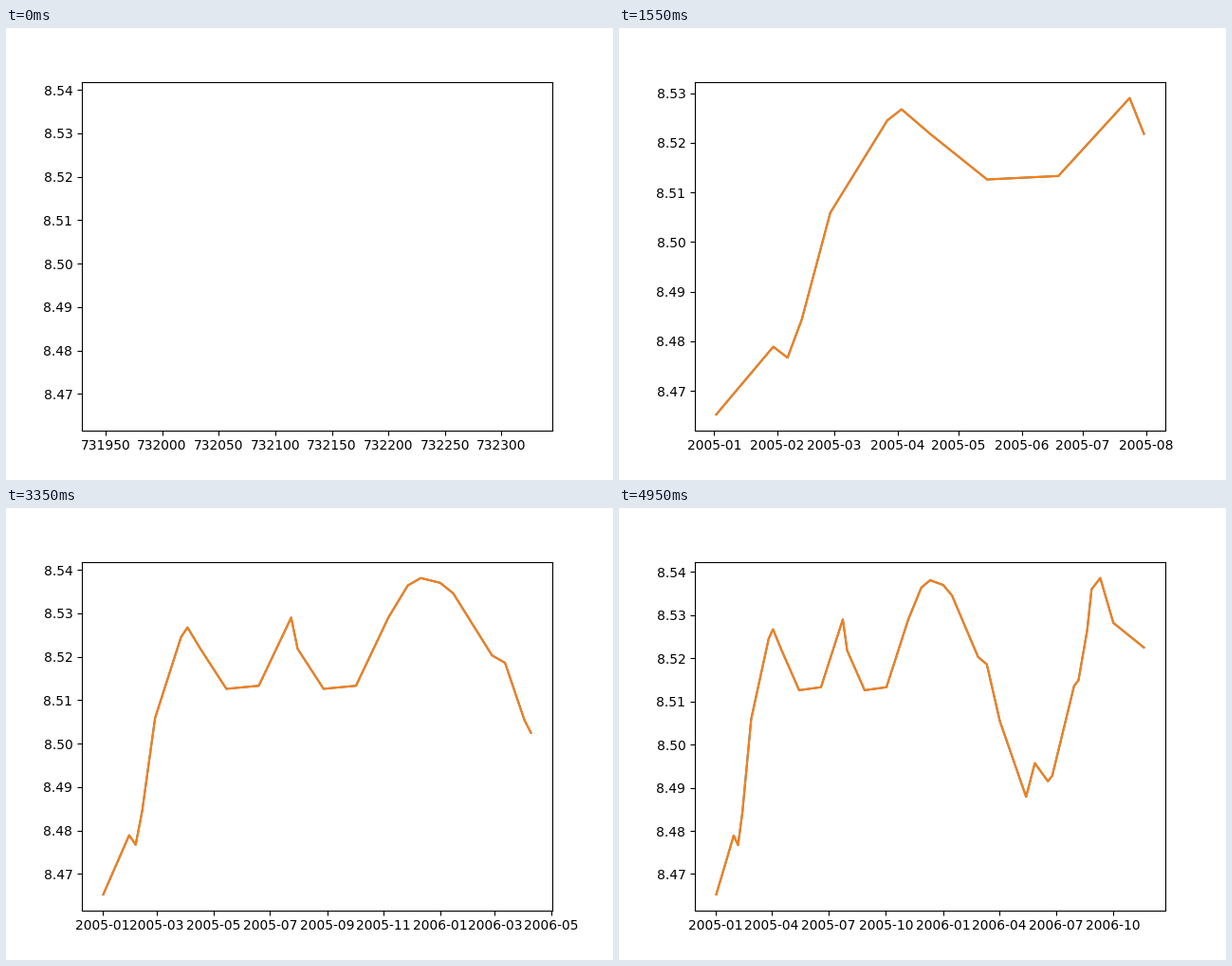
Write a matplotlib script that moves like this. It is 640 by 476 pixels and loops after 5000 ms.

```python
import numpy as np
import matplotlib.pyplot as plt
from matplotlib.animation import FuncAnimation

WEEKS = 99
INTERVAL = 50
FIRST_DAY = 731948  # ordinal of 2005-01-02
PREVIEW_WEEKS = 55
DIP_PERIOD = 15

# Turning points as (week, ten-thousandths above 8.4)
rise = [(0, 652.6), (4, 789), (5, 767), (6, 844), (8, 1059), (12, 1245),
        (13, 1267.3)]
dip = [(15, 1218), (19, 1126), (24, 1133), (29, 1290)]
second_dip = [(week + DIP_PERIOD, level) for week, level in dip]
fall = [(47, 1364), (49, 1381), (52, 1370), (54, 1346), (60, 1203),
        (62, 1186), (65, 1054), (71, 879)]
recovery = [(73, 957), (76, 915), (77, 928), (82, 1136), (83, 1149),
            (85, 1265), (86, 1360), (88, 1386), (91, 1282), (98, 1225)]

key_weeks, key_levels = zip(*rise, *dip, *second_dip, *fall, *recovery)
weeks = np.arange(WEEKS)
values = 8.4 + np.interp(weeks, key_weeks, key_levels) / 1e4
days = np.datetime64("2005-01-02") + 7 * weeks

plt.rcParams["font.family"] = "DejaVu Sans"
fig, ax = plt.subplots(figsize=(6.4, 4.76), dpi=100)


def padded(low, high):
    pad = 0.05 * (high - low)
    return low - pad, high + pad


def draw(n):
    ax.clear()
    if n == 0:
        # Empty axes on a plain day-number scale
        shown = values[:PREVIEW_WEEKS]
        ax.set_xlim(*padded(FIRST_DAY, FIRST_DAY + 7 * (PREVIEW_WEEKS - 1)))
        ax.set_ylim(*padded(shown.min(), shown.max()))
        return
    for color in ("C0", "C1"):
        ax.plot(days[:n], values[:n], color=color)


anim = FuncAnimation(fig, draw, frames=WEEKS + 1, interval=INTERVAL,
                     repeat=True, repeat_delay=0)
plt.show()
```
